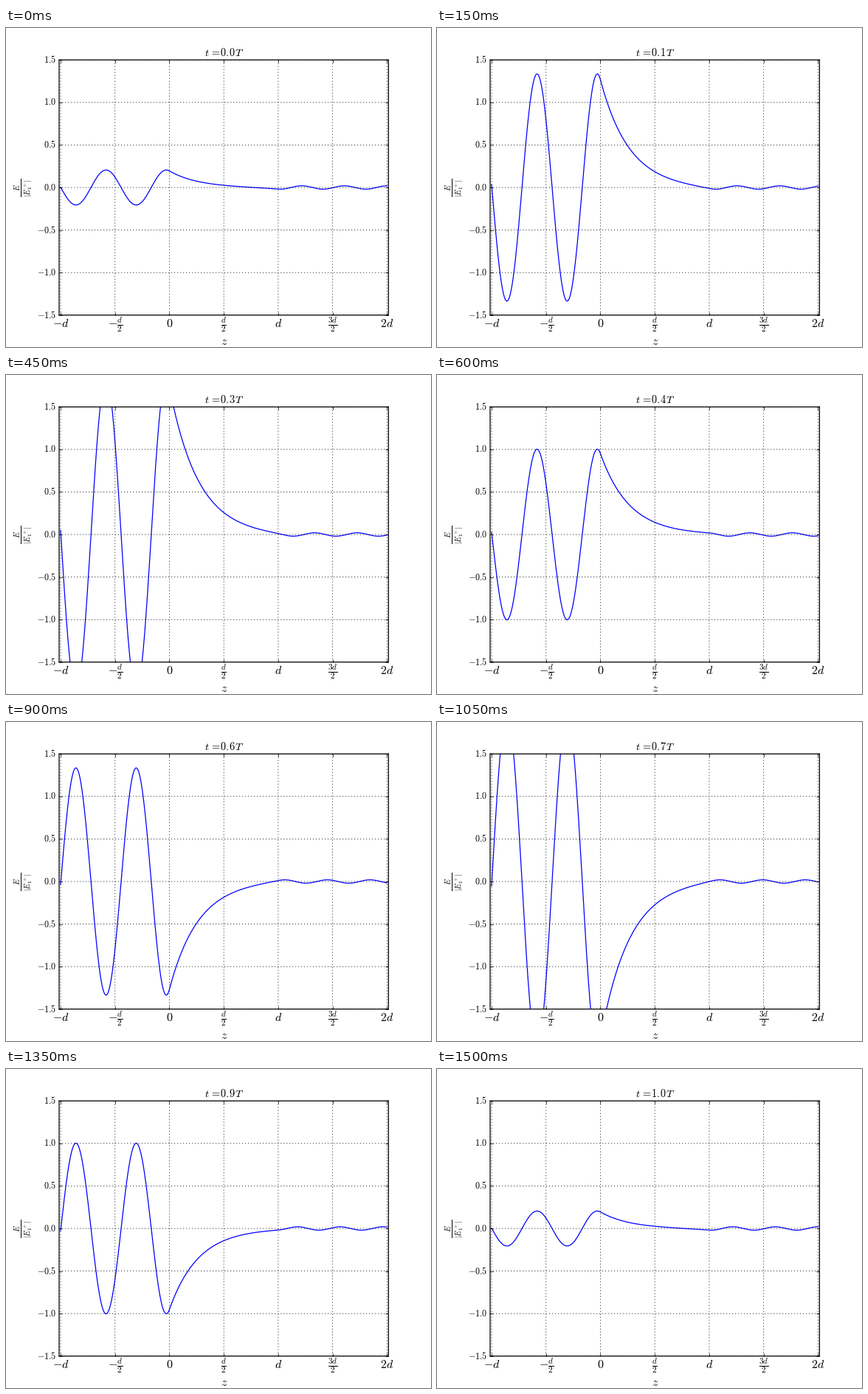
A matplotlib script for the animation above (1650 ms loop, 576 by 432 pixels).

```python
import numpy as np
import matplotlib.pyplot as plt
from matplotlib.animation import FuncAnimation

WIDTH, HEIGHT, DPI = 576, 432, 72
FRAMES, INTERVAL = 11, 150
THICK, THIN = 1.25, 0.75

plt.rcParams.update({
    "mathtext.fontset": "cm",
    "path.snap": False,
    "lines.scale_dashes": False,
    "lines.dash_capstyle": "butt",
    "axes.linewidth": THICK,
    "axes.axisbelow": False,
})

# Wave numbers in units of 1/d: 45 degree incidence from index 1.5 onto a gap
K0 = 10.695
K1 = K0 * 1.5 * np.sqrt(0.5)
KAPPA = K0 * np.sqrt(1.125 - 1)
K3 = K0 * 1.5


def gap_field(z):
    """Field and slope inside the gap for a unit transmitted wave at z = 1."""
    ratio = 1j * K3 / KAPPA
    falling = (1 - ratio) / 2 * np.exp(-KAPPA * (z - 1))
    rising = (1 + ratio) / 2 * np.exp(KAPPA * (z - 1))
    return falling + rising, KAPPA * (rising - falling)


def complex_field(z):
    """Field over the incident amplitude, with a crest at z = 2 when t = 0."""
    value, slope = gap_field(0.0)
    forward = (value + slope / (1j * K1)) / 2
    backward = value - forward
    front = forward * np.exp(1j * K1 * z) + backward * np.exp(-1j * K1 * z)
    gap = gap_field(np.clip(z, 0, 1))[0]
    behind = np.exp(1j * K3 * (z - 1))
    field = np.where(z < 0, front, np.where(z < 1, gap, behind))
    return field * np.exp(-1j * K3) / abs(forward)


fig = plt.figure(figsize=(WIDTH / DPI, HEIGHT / DPI), dpi=DPI, facecolor="white")
ax = fig.add_axes([0.125, 0.1, 0.775, 0.8])
margin = 2 * 3 / 442.4
ax.set_xlim(-1 - margin, 2 + margin)
ax.set_ylim(-1.5, 1.5)


def label(x, y, text, size, **style):
    """Place text by pixel position, measured from the top left."""
    options = {"ha": "center", "va": "baseline", **style}
    return fig.text(x / WIDTH, 1 - y / HEIGHT, text, fontsize=size, **options)


x_ticks = np.linspace(-1, 2, 7)
x_names = ["-d", r"-\frac{d}{2}", "0", r"\frac{d}{2}", "d", r"\frac{3d}{2}", "2d"]
ax.set_xticks(x_ticks, [""] * len(x_ticks))
for i, name in enumerate(x_names):
    label(74.2 + i * 442.4 / 6, 405, f"${name}$", 16)

y_ticks = np.linspace(-1.5, 1.5, 7)
ax.set_yticks(y_ticks, [f"${y:.1f}$" for y in y_ticks], fontsize=12, va="center")
ax.tick_params(direction="in", length=4, width=THIN, pad=4, top=True, right=True)
ax.grid(True, color="black", linewidth=THIN, linestyle=(0, (1.2, 2.8)))

label(295.5, 429, "$z$", 16)
label(24, 216, r"$\frac{E}{|E_1^+|}$", 15, va="center", rotation=90)
title = label(296, 38, "", 14.4)

z = np.linspace(-1, 2, 1501)
field = complex_field(z)
curve, = ax.plot(z, field.real, color="blue", linewidth=THICK)


def update(frame):
    t = frame / 10
    whole, tenth = f"{t:.1f}".split(".")
    number = rf"\mathbf{{{whole}.}}\hspace{{-0.1}}\mathbf{{{tenth}}}"
    curve.set_ydata((field * np.exp(-2j * np.pi * t)).real)
    title.set_text(rf"$t\hspace{{0.12}}=\hspace{{-0.15}}{number}\hspace{{0.04}}T$")
    return curve, title


animation = FuncAnimation(fig, update, frames=FRAMES, interval=INTERVAL,
                          repeat=True, repeat_delay=0)
plt.show()
```
